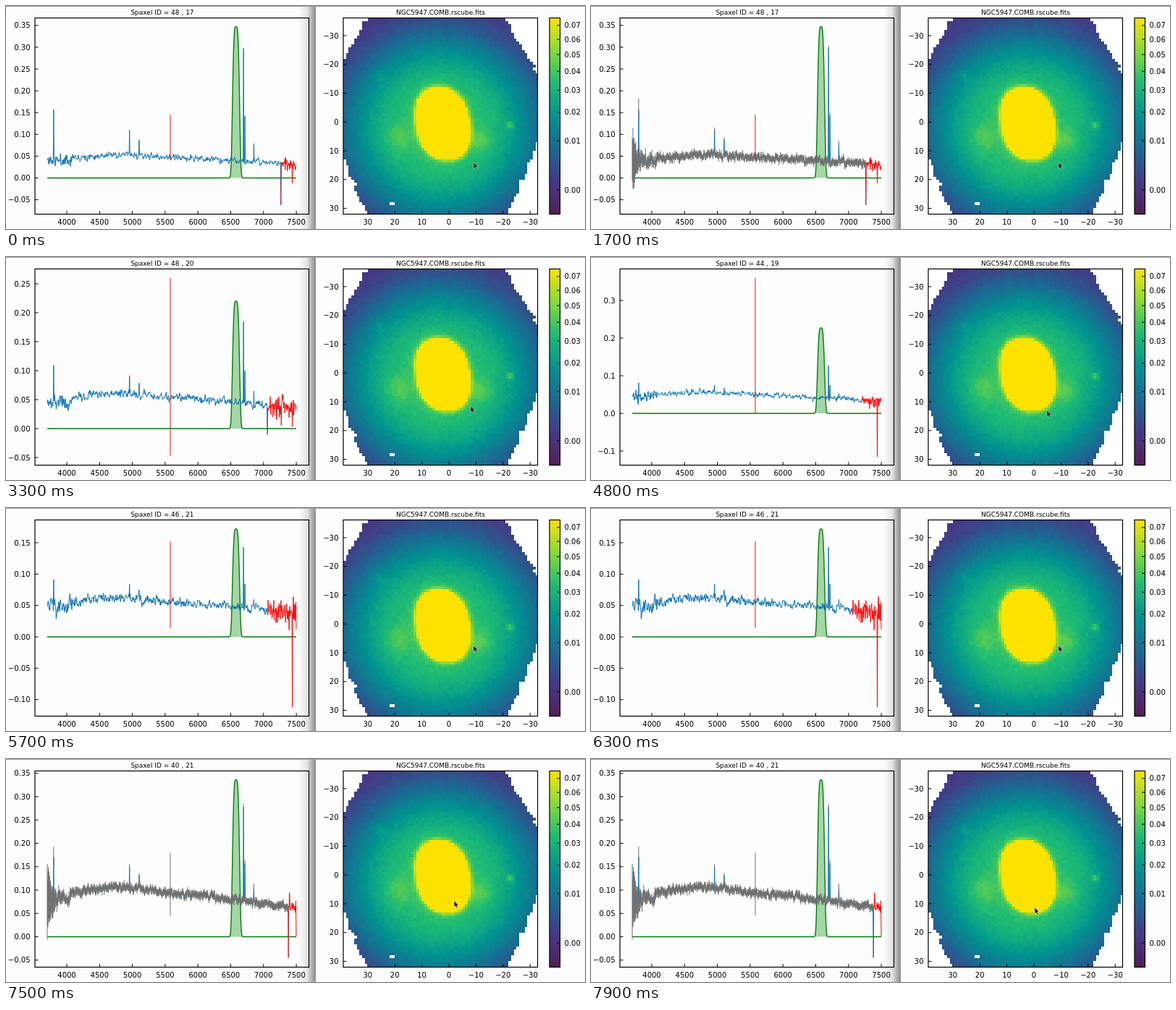
Recreate the animation shown at these times as an HTML page with a canvas. Size 800x308 px, loop 8000 ms.

```html
<!DOCTYPE html>
<html lang="en">
<head>
<meta charset="utf-8">
<title>Spaxel explorer</title>
<style>
  html, body { margin: 0; width: 100%; height: 100%; overflow: hidden; background: #fdfdfd; }
  canvas, svg { position: absolute; left: 0; top: 0; width: 800px; height: 308px; }
  text { font-family: "DejaVu Sans", sans-serif; font-size: 10px; fill: #000; }
  .title { font-size: 9px; text-anchor: middle; }
  .mid { text-anchor: middle; }
  .end { text-anchor: end; }
  path { fill: none; stroke-width: 1; stroke-linejoin: round; }
</style>
</head>
<body>
<canvas id="map" width="800" height="308"></canvas>
<svg id="stage" viewBox="0 0 800 308">
  <defs>
    <linearGradient id="shade">
      <stop offset="0" stop-color="#000" stop-opacity="0"/>
      <stop offset=".5" stop-color="#000" stop-opacity=".1"/>
      <stop offset="1" stop-color="#000" stop-opacity=".46"/>
    </linearGradient>
    <linearGradient id="scale" x1="0" y1="1" x2="0" y2="0"></linearGradient>
    <clipPath id="clip"><rect x="40" y="17" width="378.5" height="270.5"/></clipPath>
  </defs>
  <g id="plots"></g>
  <g id="frame"></g>
  <rect x="404" y="0" width="24" height="308" fill="url(#shade)"/>
  <path d="M0 .5H800" stroke="#999"/>
  <path id="pointer" d="M0 0V8.4L2 6.7L3.4 9.6L4.9 8.9L3.6 6.1L6 5.9Z" style="fill:#000;stroke:#fff;stroke-width:.5"/>
</svg>
<script>
const LOOP = 8000, GLIDE = 400, TOP = 17, BOTTOM = 287.5;
const X0 = 57, X1 = 401, SAMPLES = 700, DX = (X1 - X0) / (SAMPLES - 1);
const NOISE = .0038, ERROR = .0065, BLUE_ERROR = .055;
const COLOURS = ['#541e56', '#453a86', '#1a6a92', '#009390', '#1ebb74', '#86da38', '#fde200'];

// from, errorsFrom: ms; at: pointer; zero, unit: y axis in px; flag: x where flagged data begin;
// edge: value just before the flag; low: deepest flagged value; sky: ends of the night-sky line
const SPECTRA = [
  { id: '48 , 17', from: 0, errorsFrom: 1300, at: [646, 216], zero: 237.5, unit: 602, peak: .347, halpha: .306,
    level: .047, flag: 380, sky: [.04, .145], edge: -.062, low: -.012 },
  { id: '48 , 20', from: 2300, at: [646, 204], zero: 237, unit: 800, peak: .22, halpha: .195,
    level: .054, flag: 361, sky: [-.047, .26], edge: -.01, low: .004 },
  { id: '44 , 19', from: 3500, at: [630, 212], zero: 216, unit: 520, peak: .227, halpha: .136,
    level: .05, flag: 374, sky: [0, .36], low: -.115 },
  { id: '46 , 21', from: 5200, at: [646, 190], zero: 178, unit: 867, peak: .172, halpha: .153,
    level: .056, flag: 361, sky: [.014, .152], low: -.112 },
  { id: '49 , 28', from: 6700, errorsFrom: 6700, at: [638, 169], zero: 180, unit: 967, peak: .157, halpha: .137,
    level: .055, flag: 354, sky: [.045, .143], edge: .011, low: 0 },
  { id: '40 , 21', from: 7500, errorsFrom: 7500, at: [613, 205], zero: 245.5, unit: 645, peak: .336, halpha: .295,
    level: .094, flag: 390, sky: [.045, .18], skyColour: '#62747f', edge: -.045, low: 0 }
];
// emission lines: x and strength relative to the strongest
const LINES = [[66, .45], [170.5, .22], [184, .14], [328, 1], [330, .4], [342.5, .16]];

const byId = id => document.getElementById(id);
const r2 = n => Math.round(n * 100) / 100;
const bell = (d, width, power = 2) => Math.exp(-Math.pow(Math.abs(d) / width, power));

function add(parent, tag, attrs, text) {
  const el = document.createElementNS('http://www.w3.org/2000/svg', tag);
  for (const k in attrs) el.setAttribute(k, attrs[k]);
  if (text !== undefined) el.textContent = text;
  return parent.appendChild(el);
}

function random(seed) {
  return () => {
    seed = seed + 0x6D2B79F5 | 0;
    let t = Math.imul(seed ^ seed >>> 15, 1 | seed);
    t = t + Math.imul(t ^ t >>> 7, 61 | t) ^ t;
    return ((t ^ t >>> 14) >>> 0) / 4294967296;
  };
}
const gauss = rnd => (rnd() + rnd() + rnd() + rnd() - 2) * 1.73;

const RGB = COLOURS.map(c => [1, 3, 5].map(i => parseInt(c.slice(i, i + 2), 16)));
function colour(t) {
  const p = Math.min(.9999, Math.max(0, t)) * (RGB.length - 1), i = Math.floor(p);
  return `rgb(${RGB[i].map((c, n) => Math.round(c + (RGB[i + 1][n] - c) * (p - i)))})`;
}

const number = (v, digits) => (v < 0 ? '\u2212' : '') + Math.abs(v).toFixed(digits);

function yTick(parent, x, y, label) {
  add(parent, 'path', { d: `M${x} ${r2(y)}h4.5`, stroke: '#000' });
  add(parent, 'text', { x: x - 6.5, y: r2(y + 3.6), class: 'end' }, label);
}
function xTick(parent, x, label) {
  add(parent, 'path', { d: `M${x} ${BOTTOM}v-4.5`, stroke: '#000' });
  add(parent, 'text', { x, y: 301.7, class: 'mid' }, label);
}

function continuum(x) {
  const slope = Math.max(0, x - 265) / 136;
  return .95 - .29 * slope + .18 * bell(x - 155, 60) - (x < 91 ? .12 : 0);
}

function fluxes(s, rnd) {
  const values = [];
  let drift = 0;
  for (let i = 0; i < SAMPLES; i++) {
    const x = X0 + i * DX, g = gauss(rnd);
    drift = .5 * drift + g;
    const scatter = x > s.flag ? g * 1.8 + .25 * g ** 3 : drift * (x < 91 ? 1.8 : .85);
    values.push(s.level * continuum(x) + NOISE * scatter);
  }
  const put = (x, v) => { values[Math.round((x - X0) / DX)] = v; };
  for (const [x, strength] of LINES) put(x, s.level * continuum(x) + (s.halpha - s.level) * strength);
  if (s.edge !== undefined) put(s.flag, s.edge);
  put(s.low === 0 ? X1 : 395.5, s.low);
  return values;
}

function buildSpectrum(s, index) {
  const rnd = random(index * 97 + 11), values = fluxes(s, rnd);
  const py = v => r2(s.zero - v * s.unit);
  const line = (from, to) => 'M' + values.slice(from, to).map((v, i) => `${r2(X0 + (i + from) * DX)} ${py(v)}`).join('L');
  const cut = Math.round((s.flag - X0) / DX) + 1;

  const g = add(byId('plots'), 'g', { display: 'none' });
  add(g, 'text', { x: 216, y: 12.2, class: 'title' }, 'Spaxel ID = ' + s.id);
  const step = s.unit > 550 ? .05 : .1;
  for (let k = -4; k < 9; k++) {
    const y = s.zero - k * step * s.unit;
    if (y > TOP && y < BOTTOM) yTick(g, 40, y, number(k * step, step < .1 ? 2 : 1));
  }

  const data = add(g, 'g', { 'clip-path': 'url(#clip)' });
  let band = `M${X0} ${s.zero}`;
  for (let x = 300; x <= 335; x += .5) band += `L${x} ${py(s.peak * bell(x - 317.8, 5.4, 3.8))}`;
  add(data, 'path', { d: `${band}L${X1} ${s.zero}`, stroke: '#007d10', style: 'fill:#2ca02c;fill-opacity:.42;stroke-width:1.4' });
  add(data, 'path', { d: line(0, cut), stroke: '#0a70b2' });

  let errors;
  if (s.errorsFrom) {
    let d = '';
    for (let i = 0; i < cut - 2; i++) {
      const x = X0 + i * DX;
      const e = (ERROR * (1 + bell(x - X0, 25, 1)) + BLUE_ERROR * bell(x - X0, 5, 1)) * (.7 + .6 * rnd());
      d += `M${r2(x)} ${py(values[i] - e)}V${py(values[i] + e)}`;
    }
    errors = add(data, 'path', { d, stroke: '#707070' });
  }
  add(data, 'path', { d: line(cut - 1, SAMPLES), stroke: '#f40808' });
  add(data, 'path', { d: `M227 ${py(s.sky[0])}V${py(s.sky[1])}`, stroke: s.skyColour || '#e01414' });
  return { g, errors };
}

// brightness of the galaxy, 0 to 1
function brightness(x, y) {
  const dx = x - 603.5, dy = y - 162.5;
  const q = Math.pow(Math.abs((dx - .12 * dy) / 37.5), 2.3) + Math.pow(Math.abs(dy / 50), 2.3);
  if (q < 1) return 1;
  const clump = (cx, cy, size) => bell(Math.hypot(x - cx, y - cy), size);
  return .12 + .58 * bell(Math.hypot((x - 601) / 1.04, y - 168), 131, 3.5)
    + .25 * Math.exp((1 - Math.sqrt(q)) * 13)
    + .2 * clump(697, 165, 5) + .1 * clump(655, 185, 14) + .08 * clump(542, 182, 18) + .06 * clump(515, 96, 9);
}

function drawGalaxy() {
  const ctx = byId('map').getContext('2d'), rnd = random(5947);
  const cw = 3.74, ch = 3.975;
  ctx.fillStyle = '#fff';
  ctx.fillRect(466, TOP, 268, 270);
  ctx.beginPath();
  ctx.rect(466, TOP, 268.5, 270.5);
  ctx.clip();
  for (let j = 0; j < 68; j++) {
    const y = TOP + (j + .5) * ch, jag = (rnd() - .5) * 5;
    const slope = y < 141 ? .58 : .4, reach = Math.abs(y - 141);
    const left = 466 + slope * (reach - 67) + jag, right = 734 - slope * (reach - 48) - jag;
    for (let i = 0; i < 72; i++) {
      const x = 466 + (i + .5) * cw, grain = gauss(rnd) * .012;
      const hole = Math.hypot((x - 533) / 2, y - 273) < 2.2;
      if (x < left || x > right || hole) continue;
      const px = Math.round(466 + i * cw), py = Math.round(TOP + j * ch);
      ctx.fillStyle = colour(brightness(x, y) + grain * (brightness(x, y) < 1));
      ctx.fillRect(px, py, Math.round(466 + (i + 1) * cw) - px, Math.round(TOP + (j + 1) * ch) - py);
    }
  }
}

function drawFrame() {
  const g = byId('frame');
  const box = (x, w, fill) => add(g, 'rect', { x, y: TOP - .5, width: w, height: 271, fill, stroke: '#000', 'stroke-width': 1.2 });
  COLOURS.forEach((c, i) => add(byId('scale'), 'stop', { offset: i / (COLOURS.length - 1), 'stop-color': c }));
  box(40, 378.5, 'none');
  box(466, 268.5, 'none');
  box(751, 14.5, 'url(#scale)');
  add(g, 'text', { x: 600.5, y: 12.2, class: 'title' }, 'NGC5947.COMB.rscube.fits');
  for (let w = 4000; w <= 7500; w += 500) xTick(g, r2(84 + (w - 4000) * .0906), w);
  for (let v = -30; v <= 30; v += 10) {
    xTick(g, r2(612 - v * 3.74), number(v, 0));
    yTick(g, 466, 160.2 + v * 3.975, number(v, 0));
  }
  for (let k = 0; k < 8; k++) {
    const y = r2(292.4 - 993 * Math.sqrt(k / 100 + .0015));
    add(g, 'path', { d: `M765.5 ${y}h-4.5`, stroke: '#000' });
    add(g, 'text', { x: 771.5, y: r2(y + 3.6) }, (k / 100).toFixed(2));
  }
}

function pointerAt(t) {
  return SPECTRA.slice(1).reduce((p, s) => {
    const k = Math.min(1, Math.max(0, (t - s.from) / GLIDE + .75));
    return p.map((c, i) => c + (s.at[i] - c) * k);
  }, SPECTRA[0].at);
}

drawGalaxy();
drawFrame();
const plots = SPECTRA.map(buildSpectrum);

function render(now) {
  const t = Math.floor((now % LOOP) / 100) * 100;
  const current = SPECTRA.filter(s => s.from <= t).length - 1;
  plots.forEach((p, i) => {
    p.g.setAttribute('display', i === current ? 'inline' : 'none');
    if (p.errors) p.errors.setAttribute('display', t >= SPECTRA[i].errorsFrom ? 'inline' : 'none');
  });
  byId('pointer').setAttribute('transform', `translate(${pointerAt(t).map(r2)})`);
}

const start = performance.now();
function tick() {
  render(performance.now() - start);
  requestAnimationFrame(tick);
}
tick();
</script>
</body>
</html>
```
